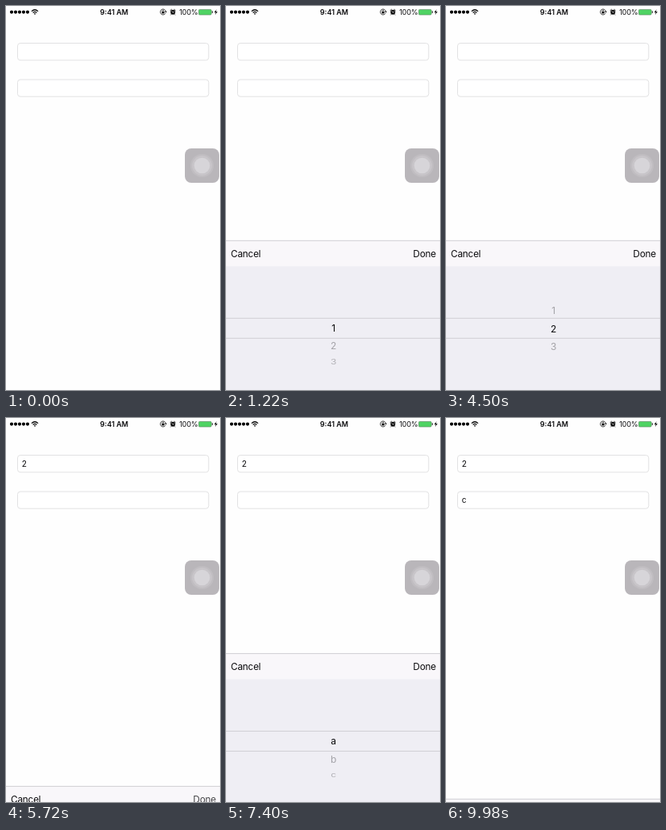
Write an HTML page that moves like this. It is 268 px wide and 480 px high and loops after 10000 ms.

```html
<!DOCTYPE html>
<html lang="en">
<head>
<meta charset="utf-8">
<title>Picker input</title>
<style>
  html, body { margin: 0; width: 100%; height: 100%; overflow: hidden; background: #fefefe; }
  svg { display: block; width: 100vw; height: 100vh; }
  text { font-family: Inter, Roboto, sans-serif; fill: #0b0b0d; }
  .status { font-size: 9px; }
  .field rect { fill: #fff; stroke: #e2e2e3; }
  .field text { font-size: 10.2px; }
  .bar text { font-size: 11.8px; letter-spacing: -.2px; }
  .row { font-size: 12px; text-anchor: middle; }
  .dim .row { fill: #a3a2a7; }
  .edge { stroke: #d0cfd4; }
</style>
</head>
<body>
<svg viewBox="0 0 268 480">
  <defs>
    <clipPath id="band"><rect y="97" width="268" height="25"/></clipPath>
    <clipPath id="outside"><path d="M0 63.5H268V97H0ZM0 122H268V155.5H0Z"/></clipPath>
  </defs>
  <rect width="268" height="480" fill="#fefefe"/>

  <g class="status">
    <path d="M7 7.6h20.2" stroke="#000" stroke-width="4.2" stroke-linecap="round" stroke-dasharray="0 5"/>
    <g fill="none" stroke="#000" stroke-width="1.2">
      <path d="M32 6.6Q36.1 2.9 40.2 6.6M33.6 8.4Q36.1 6.2 38.6 8.4"/>
      <path d="M36.1 10.9L34.9 9.5Q36.1 8.6 37.3 9.5Z" fill="#000" stroke="none"/>
    </g>
    <text x="135.5" y="10.8" text-anchor="middle" font-weight="600">9:41 AM</text>
    <g fill="none" stroke="#111" stroke-width=".8">
      <path d="M199.7 9.3A3.5 3.5 0 1 1 200.2 7.1"/>
      <path d="M198.9 6.8h2.6l-1.3 1.7z" fill="#111" stroke="none"/>
      <path d="M195.7 7.2v-.8a1 1 0 0 1 2 0v.8"/>
      <rect x="195" y="7" width="3.4" height="2.4" fill="#111" stroke="none"/>
    </g>
    <circle cx="209" cy="7.8" r="3" fill="#111"/>
    <path d="M205.6 5.8l2-1.7M212.4 5.8l-2-1.7M207 10.4l-.8.9M211 10.4l.8.9" stroke="#111"/>
    <path d="M207.6 6.6L209 8.1L210.6 7.3" fill="none" stroke="#fff" stroke-width=".7"/>
    <text x="217" y="10.9" letter-spacing="-.1">100%</text>
    <rect x="241.4" y="4.4" width="15.8" height="6.6" rx="1.2" fill="#4fd363" stroke="#5b8a63" stroke-width=".7"/>
    <path d="M258.4 6.3v2.6" stroke="#333"/>
    <path d="M263.6 4.2L260.8 8.1H262.6L261.9 11L264.9 6.9H263Z" fill="#111"/>
  </g>

  <g class="field">
    <rect x="14.5" y="46.5" width="239.3" height="21.3" rx="3.5"/>
    <text id="first" x="19.8" y="60.7">2</text>
    <rect x="14.5" y="92" width="239.3" height="21.2" rx="3.5"/>
    <text id="second" x="19.8" y="106.2">c</text>
  </g>

  <g>
    <rect x="224" y="178" width="43" height="43" rx="8" fill="#b9b6ba"/>
    <circle cx="245.5" cy="199.5" r="14.6" fill="#c0bdc1"/>
    <circle cx="245.5" cy="199.5" r="12.4" fill="#c8c5c9"/>
    <circle cx="245.5" cy="199.5" r="9.8" fill="#d7d5d9"/>
  </g>

  <g id="panel">
    <rect width="268" height="32" fill="#f9f7fa"/>
    <rect y="32" width="268" height="160" fill="#efeef4"/>
    <path class="edge" d="M0 0H268M0 97H268M0 122H268"/>
    <g class="bar">
      <text x="6" y="20.4">Cancel</text>
      <text id="done" x="263" y="20.4" text-anchor="end">Done</text>
    </g>
    <g class="dim" clip-path="url(#outside)"></g>
    <g class="lit" clip-path="url(#band)"></g>
  </g>
</svg>

<script>
const LOOP = 10000, PANEL_TOP = 293, PANEL_HEIGHT = 187;
const WHEEL = { center: 109.6, radius: 62.5, step: 21.1 * Math.PI / 180 };

const sessions = [
  { items: ['1', '2', '3'], show: 340, press: 5380, hide: 5515,
    scroll: [[3480, 0], [4650, 1]] },
  { items: ['a', 'b', 'c'], show: 7010, press: 9540, hide: 9669,
    scroll: [[7900, 0], [9020, 2.12], [9090, 2.12], [9400, 2]] }
];

const $ = id => document.getElementById(id);
const panel = $('panel'), done = $('done');
const fields = [$('first'), $('second')];

const layers = ['.dim', '.lit'].map(selector =>
  sessions[0].items.map(() => {
    const row = document.createElementNS('http://www.w3.org/2000/svg', 'text');
    row.setAttribute('class', 'row');
    row.setAttribute('y', 4.3);
    document.querySelector(selector).append(row);
    return row;
  }));

const clamp = x => Math.min(1, Math.max(0, x));
const smooth = x => x * x * (3 - 2 * x);

// Critically damped spring from 0 to 1
function spring(ms) {
  const x = 0.0185 * Math.max(0, ms);
  return 1 - (1 + x) * Math.exp(-x);
}

function track(steps, t) {
  let value = steps[0][1];
  for (let i = 1; i < steps.length; i++) {
    const [start, from] = steps[i - 1], [end, to] = steps[i];
    if (t >= start) value = from + (to - from) * smooth(clamp((t - start) / (end - start)));
  }
  return value;
}

function drawWheel(items, position) {
  items.forEach((label, i) => {
    const angle = (i - position) * WHEEL.step;
    const y = WHEEL.center + WHEEL.radius * Math.sin(angle);
    for (const rows of layers) {
      rows[i].textContent = label;
      rows[i].setAttribute('transform', `translate(134.7 ${y}) scale(1 ${Math.cos(angle)})`);
      rows[i].setAttribute('opacity', clamp(1.25 - Math.abs(angle) * 0.6));
    }
  });
}

function render(t) {
  const session = t < 6500 ? sessions[0] : sessions[1];
  const { items, show, press, hide, scroll } = session;
  const shown = t < hide ? spring(t - show) : 1 - spring(t - hide);
  panel.setAttribute('transform', `translate(0 ${PANEL_TOP + PANEL_HEIGHT * (1 - shown) + 0.3})`);
  panel.style.visibility = shown > 0.001 ? 'visible' : 'hidden';
  done.setAttribute('opacity', t < press ? 1 : 0.2 + 0.8 * clamp((t - hide) / 300));
  drawWheel(items, track(scroll, t));
  fields.forEach((field, i) => {
    field.style.visibility = t >= sessions[i].hide - 15 ? 'visible' : 'hidden';
  });
}

const begin = performance.now();
function tick() {
  render((performance.now() - begin) % LOOP);
  requestAnimationFrame(tick);
}
tick();
</script>
</body>
</html>
```
